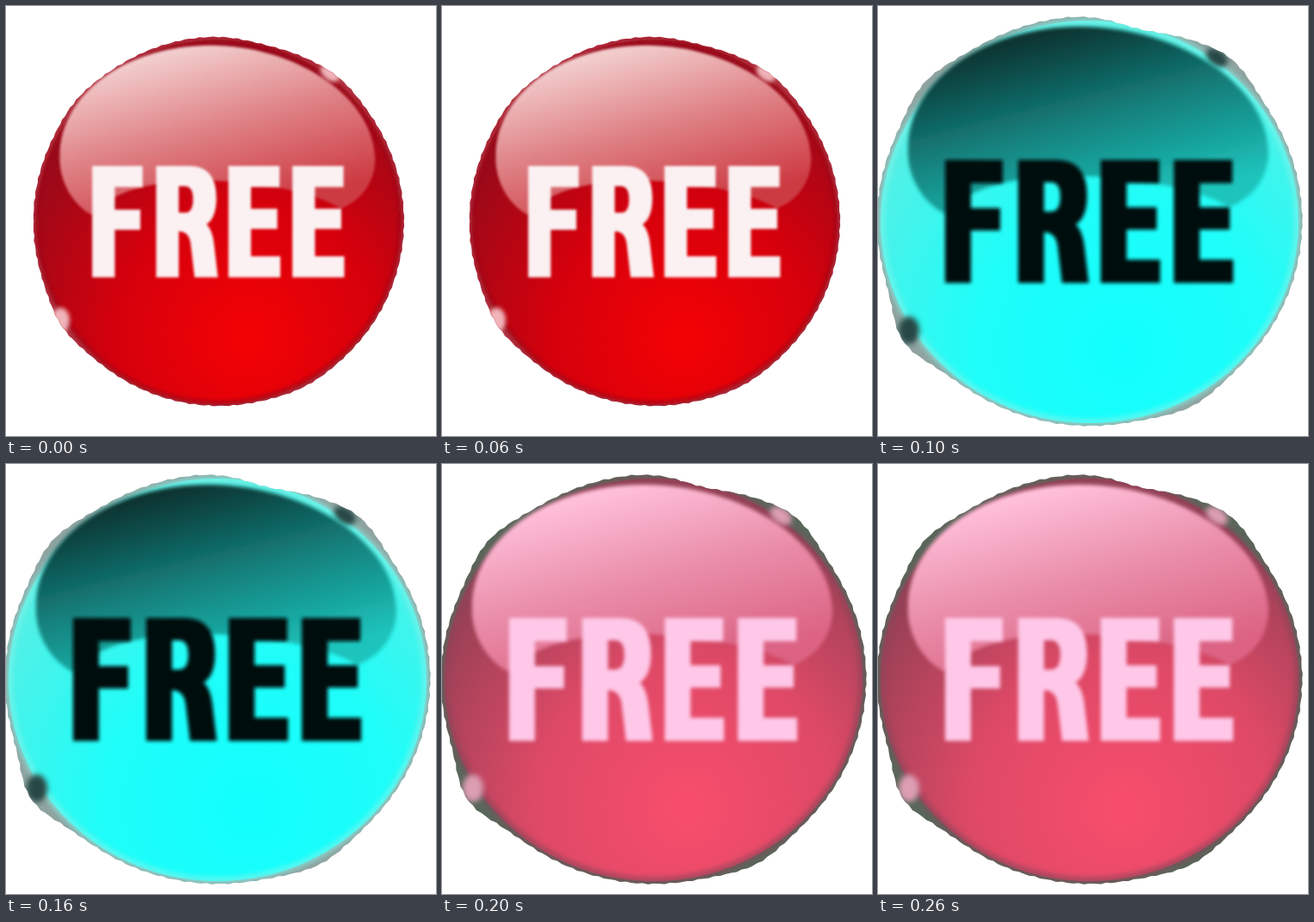
Write an HTML page that moves like this. It is 500 px wide and 500 px high and loops after 0.3 s.

```html
<!DOCTYPE html>
<html lang="en">
<head>
<meta charset="utf-8">
<title>Flashing FREE button</title>
<style>
html, body { margin: 0; width: 100%; height: 100%; overflow: hidden; background: #fff; }
svg { display: block; width: 100vw; height: 100vh; }
.look { animation: flash 300ms step-end infinite; }
@keyframes flash {
  0% { visibility: visible; }
  33.333%, 100% { visibility: hidden; }
}
</style>
</head>
<body>
<svg id="stage" viewBox="0 0 500 500" role="img" aria-label="FREE">
  <defs>
    <filter id="soft" x="-5%" y="-5%" width="110%" height="110%"><feGaussianBlur stdDeviation="1.9"/></filter>
    <filter id="haze" x="-20%" y="-20%" width="140%" height="140%"><feGaussianBlur stdDeviation="3"/></filter>
    <path id="gloss" d="M35 165C36 85 125 24 235 24C345 24 452 88 454 170C454 203 432 225 408 234C360 200 135 170 78 242C50 228 33 195 35 165Z"/>
    <path id="e" d="M259 179H327V206H289V234H324V260H289V295H328V322H259Z"/>
    <g id="word">
      <path d="M78 179H145V206H108V235H142V261H108V322H78Z"/>
      <path fill-rule="evenodd" d="M163 179H207Q243 179 243 220Q243 246 230 254Q238 262 240 280L245 322H214L209 280Q207 263 193 263V322H163ZM193 205V239H201Q212 239 212 222Q212 205 201 205Z"/>
      <use href="#e"/>
      <use href="#e" x="85"/>
    </g>
    <g id="chips">
      <ellipse cx="36" cy="377" rx="12" ry="16"/>
      <ellipse cx="394" cy="60" rx="14" ry="9" transform="rotate(35 394 60)"/>
    </g>
  </defs>
</svg>
<script>
// base: from the lit bottom to the edge; shine: from top to bottom
const looks = [
  { move: "translate(32 24) scale(.875 .905)", wobble: .35, fringe: "#b23a46", chip: "#f0b4b9", rim: "#a00d1c", word: "#fbf1f2",
    base: ["#f40204", "#d5000c", "#960a1a"], shine: ["#f2cccc", "#de7f83", "#cd3a42"] },
  { move: "", wobble: 1, fringe: "#8fa3a0", chip: "#274744", rim: "#7df3ea", word: "#040909",
    base: ["#10ffff", "#1ffdf9", "#55efe4"], shine: ["#083432", "#15817d", "#1cc4bc"] },
  { move: "", wobble: 1, fringe: "#59665a", chip: "#dd9db2", rim: "#8d4458", word: "#ffc8e8",
    base: ["#f84d6c", "#de4966", "#964055"], shine: ["#ffbfd9", "#e98da9", "#dc6383"] }
];

// bumps of the rough cut edge: angle in degrees, height relative to the radius
const bumps = [[-76, -.035], [-50, .035], [62, .025], [146, .055], [221, .03]];

const bumpAt = deg => bumps.reduce((sum, [at, height]) => {
  const gap = (deg - at + 540) % 360 - 180;
  return sum + height * Math.exp(-((gap / 10) ** 2));
}, 0);

const outline = wobble => Array.from({ length: 240 }, (_, i) => {
  const deg = i * 1.5, a = deg * Math.PI / 180;
  const r = 1.003 + wobble * (.006 + bumpAt(deg)) + .003 * Math.sin(i * 2.4);
  return `${(246 + 245 * r * Math.cos(a)).toFixed(1)},${(250 + 236 * r * Math.sin(a)).toFixed(1)}`;
}).join(" ");

const stops = colors => colors.map((c, i) =>
  `<stop offset="${i / (colors.length - 1)}" stop-color="${c}"/>`).join("");

const drawLook = (k, i) => `
  <g class="look" style="animation-delay:${i * 100 - 300}ms">
    <clipPath id="cut${i}"><polygon points="${outline(k.wobble)}"/></clipPath>
    <radialGradient id="base${i}" gradientUnits="userSpaceOnUse" cx="285" cy="400" r="350">${stops(k.base)}</radialGradient>
    <linearGradient id="shine${i}" gradientUnits="userSpaceOnUse" x1="220" y1="25" x2="275" y2="240">${stops(k.shine)}</linearGradient>
    <g transform="${k.move}">
      <g clip-path="url(#cut${i})">
        <rect width="500" height="500" fill="${k.fringe}"/>
        <ellipse cx="246" cy="251" rx="243" ry="234" fill="url(#base${i})"/>
        <ellipse cx="246" cy="251" rx="242" ry="233" fill="none" stroke="${k.rim}" stroke-width="5" filter="url(#haze)"/>
        <use href="#chips" fill="${k.chip}" filter="url(#haze)"/>
        <use href="#gloss" fill="url(#shine${i})" filter="url(#soft)"/>
        <use href="#word" fill="${k.word}" filter="url(#soft)"/>
      </g>
    </g>
  </g>`;

document.getElementById("stage").insertAdjacentHTML("beforeend", looks.map(drawLook).join(""));
</script>
</body>
</html>
```
